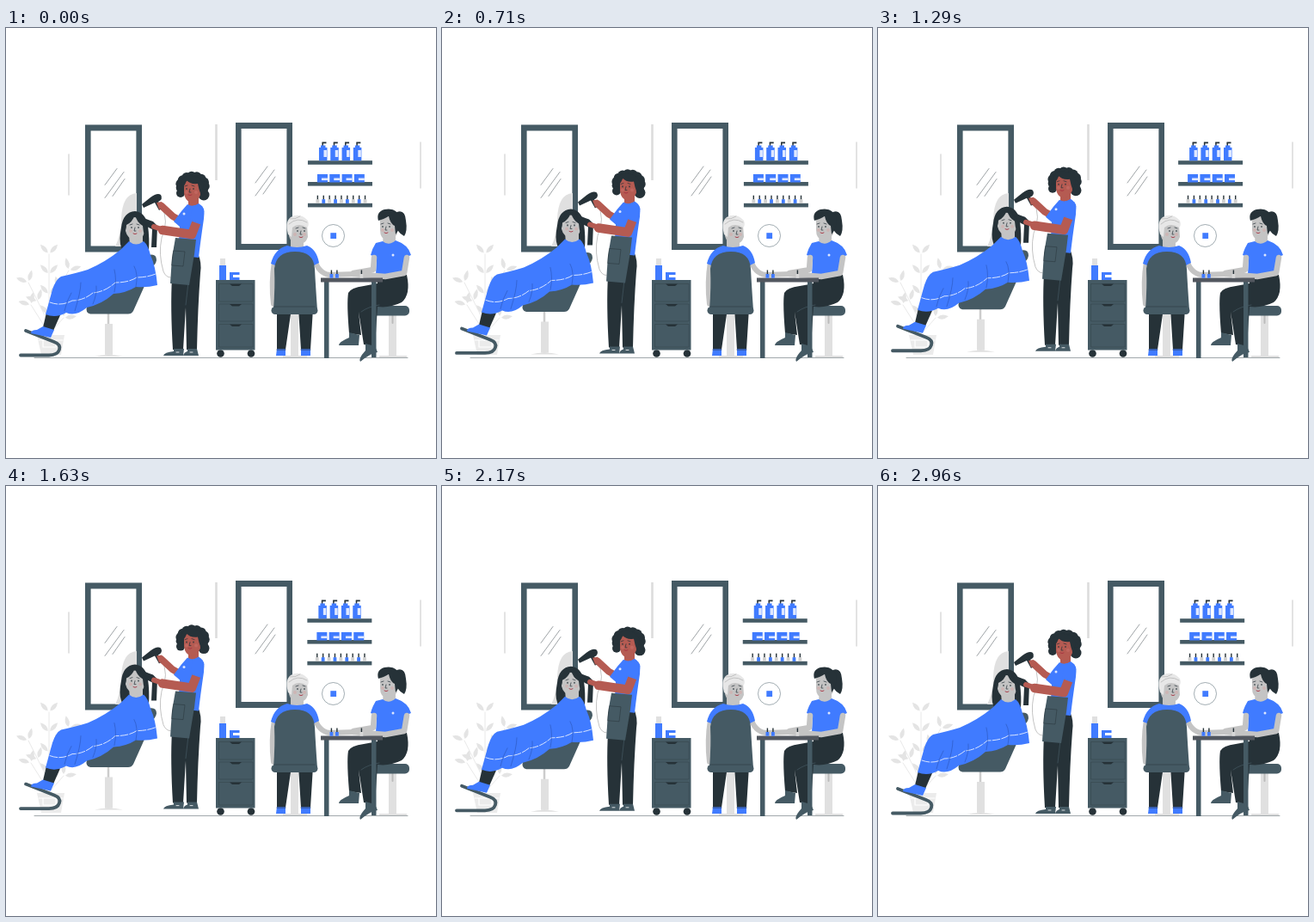
An HTML page that plays this animation: 500 by 500 pixels, repeating every 3000 ms.

```html
<!DOCTYPE html>
<html lang="en">
<head>
<meta charset="utf-8">
<title>Beauty salon</title>
<style>
html, body { margin: 0; width: 100%; height: 100%; overflow: hidden; background: #fff; }
svg { display: block; width: 100vw; height: 100vh; }
.blue { fill: #407bff; }
.dark { fill: #263238; }
.slate { fill: #455a64; }
.grey { fill: #c4c4c4; }
.pale { fill: #e0e0e0; }
.brown { fill: #b55b52; }
.line { fill: none; stroke-linecap: round; stroke-linejoin: round; }
</style>
</head>
<body>
<svg viewBox="0 0 500 500" xmlns="http://www.w3.org/2000/svg">
  <g class="line" stroke="#dcdcdc">
    <path d="M73 147V194M482 133V186" stroke-width="1.6"/>
    <path d="M244.5 112V177" stroke-width="2.6" stroke-linecap="butt"/>
  </g>

  <g id="mirrors"></g>
  <path class="pale" d="M127 254Q134 240 134 222Q135 193 152 192V254Z"/>

  <g id="plant"></g>
  <path d="M36 357H68L64 380H41Z" fill="#ebebeb"/>
  <path class="line" stroke="#fff" stroke-width="1.2" d="M38 363H66M43 363V371H58V363"/>
  <path class="line" stroke="#8a9296" stroke-width=".8" d="M33 383.5H467"/>

  <g id="shelves"></g>

  <circle cx="380.5" cy="241.5" r="13" fill="#fff" stroke="#455a64" stroke-width=".5"/>
  <rect class="blue" x="377.3" y="238.2" width="6.8" height="6.8"/>

  <g id="cabinet">
    <circle class="dark" cx="249.5" cy="378.5" r="4.3"/><circle class="dark" cx="285" cy="378.5" r="4.3"/>
    <rect class="slate" x="244" y="293" width="45.5" height="81.5"/>
    <path class="line" stroke="#263238" stroke-width=".6" d="M248 297.5H287V318H248ZM248 321H287V341H248ZM248 344.5H287V371H248Z" opacity=".5"/>
    <path class="dark" d="M260 297.5H274L271 300H263ZM260 321H274L271 323.5H263ZM260 344.5H274L271 347H263Z"/>
    <path class="blue" d="M248 276H256V293H248ZM260 284H271.5V287H264V290H271.5V293H260Z"/>
    <rect class="pale" x="249" y="268" width="6" height="8"/>
  </g>

  <g id="visitor">
    <path class="pale" d="M331 333H340V381H331ZM322 381H350V383H322Z"/>
    <path class="dark" d="M315 326H332L325 374H315ZM340 326H357L354 374H343Z"/>
    <path class="blue" d="M315 373H325V381H314ZM343 373H354V381H343Z"/>
    <path class="line" stroke="#263238" stroke-width=".8" d="M315 374H325M343 374H354"/>
    <path class="line" stroke="#c4c4c4" stroke-width="6" d="M312 272Q308 296 311 321M359 269Q363 285 376 287L406 286"/>
    <path class="grey" d="M331 243H346V257H331Z"/>
    <path class="blue" d="M308 274Q312 257 327 253Q338 257 350 253Q361 257 364 273L354 278H318Z"/>
    <path class="grey" d="M330 228Q340 222 350 229L351 243Q348 252 340 251Q331 250 329 242Z"/>
    <path d="M328 240Q324 225 331 220Q342 214 351 224Q353 230 350 232Q340 226 333 232L332 243Z" fill="#e7e7e7"/>
    <path class="line" stroke="#b8b8b8" stroke-width=".8" d="M329 228Q339 219 350 226M330 222Q336 223 342 219"/>
    <path class="slate" d="M311 328Q313 300 312 280Q314 260 336 260Q358 260 359 280Q360 300 362 328Z"/>
    <rect class="slate" x="308.5" y="324" width="54" height="9" rx="4.5"/>
    <path class="line" stroke="#263238" stroke-width=".5" d="M312 324H359"/>
  </g>

  <g id="manicurist">
    <path class="pale" d="M445 334H454V381H445ZM434 381H466V383H434Z"/>
    <path class="line" stroke="#bbb" stroke-width="2" d="M449.5 333V343"/>
    <rect class="slate" x="426" y="323" width="43" height="11.5" rx="5"/>
    <path class="dark" d="M430 287H466Q471 310 460 319Q446 326 432 324L429 370L416 368L410 330L413 357L399 355Q396 320 398 308Q401 302 416 300L432 297Z"/>
    <path class="line" stroke="#455a64" stroke-width=".7" d="M434 322Q421 324 413 330"/>
    <path class="slate" d="M399 354L411 357L410 369H387Q387 365 399 360ZM418 367L429 370L432 377Q424 378 412 388Q409 385 418 375Z"/>
    <path class="grey" d="M439 238H453V252Q445 256 438 250Z"/>
    <path class="blue" d="M438 248L430 250Q426 256 424 264L431 267L430 287H465L464 267L471 264Q468 252 453 247Q445 254 438 248Z"/>
    <path class="line" stroke="#c4c4c4" stroke-width="6.5" d="M428 267L427 281L404 285M466 267L463 285L441 289L404 286"/>
    <circle cx="450" cy="264" r="1.5" fill="#dbe6ff"/>
    <path class="dark" d="M452 215Q464 209 465 224Q467 236 463 242Q454 238 453 225Z"/>
    <path class="grey" d="M435 222Q445 216 455 225V239Q451 247 443 247Q435 245 435 235Z"/>
    <path class="dark" d="M433 224Q430 214 440 211Q455 208 459 222Q459 233 453 240L452 230Q447 228 445 219Q440 222 433 224Z"/>
  </g>

  <g id="table">
    <path class="slate" d="M370 294H375.5V384H370ZM425 294H430.5V383H425Z"/>
    <rect x="366" y="290.5" width="72" height="5" fill="#52575f"/>
    <g id="polish"></g>
  </g>

  <g id="client">
    <path class="line" stroke="#ccc" stroke-width="2.5" d="M119 330V345"/>
    <path class="pale" d="M115 344H124V380H115ZM103 382Q119 378 136 382Z"/>
    <path class="slate" d="M94 324L125 306L164 284L166 264Q175 262 175 270Q174 276 168 279L161 300L148 329Q146 332.5 142 332.5H98Q92 331 94 324Z"/>
    <path class="line" stroke="#455a64" stroke-width="3.8" d="M23 352L56 365Q64 368 62 374Q60 380.5 50 380.5H17"/>
    <path class="dark" d="M47 331L63 334L55 352L43 348Z"/>
    <path class="blue" d="M43 347L56 351L52 360L29 355Q29 351 36 351Z"/>
    <path class="dark" d="M134 255Q131 247 134 232Q136 214 150 213Q162 214 165 230Q167 245 166 258H135Z"/>
    <path class="grey" d="M143 239H159V254Q151 259 144 254Z"/>
    <path class="grey" d="M139 224Q148 216 159 224L161 238Q158 247 150 247Q141 245 139 236Z"/>
    <path class="dark" d="M136 240Q136 218 149 214Q159 214 164 232L165 250Q160 243 159 230Q152 226 150 217Q147 226 140 229Q140 236 136 240Z"/>
    <path class="blue" d="M143 248L133 258Q116 272 95 281Q82 285 64 289Q58 292 54 304L46 333Q58 338 70 331Q81 336 94 325Q112 321 125 309Q140 308 151 301Q164 302 176 299Q174 277 168 264Q165 252 160 248Q151 255 143 248Z"/>
    <path class="line" stroke="#fff" stroke-width=".8" stroke-dasharray="9 2" d="M51 319Q64 324 77 317Q90 317 101 308Q115 307 127 296Q143 296 152 290Q164 290 174 286"/>
    <path class="line" stroke="#2a55b8" stroke-width=".6" d="M80 329Q87 307 87 296M101 321Q106 309 105 300M126 307Q129 293 126 281M151 301Q154 286 149 277M68 329Q70 318 76 308"/>
  </g>

  <g id="stylist">
    <path class="line" stroke="#aaa" stroke-width=".7" d="M181 208Q190 224 181 244Q177 263 183 283Q186 290 191 290"/>
    <path class="dark" d="M193 290Q191 325 194 374H206L209 325L210 374H222Q223 325 226 285Q228 273 223 262H200Z"/>
    <path class="line" stroke="#455a64" stroke-width=".7" d="M209 322L212 296"/>
    <path class="slate" d="M195 373H207L206 381H183Q184 377 195 376ZM211 373H222L224 381H206Q207 377 211 376Z"/>
    <path class="line" stroke="#fff" stroke-width=".8" d="M198 377H201M214 377H217"/>
    <path class="brown" d="M212 194H224V210H212Z"/>
    <path class="line" stroke="#b55b52" stroke-width="8" d="M203 224L194 219L181 207"/>
    <path class="blue" d="M211 205L204 213L195 225L202 231L201 249L204 265L224 267Q226 249 230 222Q232 208 224 204Q217 209 211 205Z"/>
    <path class="slate" d="M197 244L221 246L219 263L213 299L191 297L193 267Z"/>
    <path class="line" stroke="#263238" stroke-width=".5" d="M195 259L208 260L206 277L193 276Z"/>
    <path class="dark" d="M155 218Q164 223 171 225L176 230L175 255H169L170 234Q161 231 155 218Z"/>
    <path class="line" stroke="#b55b52" stroke-width="10.5" d="M223 222L216 240L182 235"/>
    <path class="line" stroke="#b55b52" stroke-width="6" d="M184 235L172 231"/>
    <path class="blue" d="M217 207Q229 203 230.5 213L228 229L214 224Z"/>
    <circle cx="207" cy="216" r="1.5" fill="#dbe6ff"/>
    <path class="dark" d="M158 205L168 197Q176 191 180 194Q183 199 177 202L182 209L178 212L173 203L160 209Z"/>
    <path class="brown" d="M175 203L181 202L185 209L178 211Z"/>
    <g id="curls" class="dark"></g>
    <path class="brown" d="M207 180Q215 173 225 181L226 194Q223 203 215 203Q208 201 207 192Z"/>
    <path class="dark" d="M205 185Q202 176 210 172Q225 170 230 182L227 194Q224 188 223 181Q214 182 210 177Q209 182 205 185Z"/>
  </g>
</svg>
<script>
const PERIOD = 3000;
const BLUE = '#407bff', DARK = '#263238';
const byId = id => document.getElementById(id);
const add = (id, markup) => byId(id).insertAdjacentHTML('beforeend', markup);
const repeat = (count, draw) => Array.from({ length: count }, (_, i) => draw(i)).join('');
const rect = (x, y, w, h, fill) =>
  `<rect x="${x}" y="${y}" width="${w}" height="${h}" fill="${fill}"/>`;

function mirror(x, y, h) {
  return `<rect class="slate" x="${x}" y="${y}" width="66" height="${h}"/>` +
    rect(x + 6.6, y + 7, 52.8, h - 14, '#fff') +
    `<path class="line" stroke="${DARK}" stroke-width=".45" d="M${x + 23} ${y + 70}
      l14 -19m-14 34l22 -30m-13 28l14 -20"/>`;
}

function face(x, y, look) {
  return `<g transform="translate(${x} ${y})">
    <g fill="#e88a86" opacity=".25"><circle cx="-5" cy="4" r="2"/><circle cx="6" cy="4" r="2"/></g>
    <g fill="${DARK}"><ellipse cx="${look - 4}" rx=".7" ry="1.1"/><ellipse cx="${look + 4}" rx=".7" ry="1.1"/></g>
    <path class="line" stroke="${DARK}" stroke-width=".7"
      d="M${look - 6} -3l3 -1m5 0l3 1M${look} 0l-1 4h2"/>
    <path class="line" stroke="#a83240" stroke-width=".9" d="M${look - 2} 7q2 1.5 4 0"/>
  </g>`;
}

function leaf(x, y, angle, size) {
  return `<path transform="translate(${x} ${y}) rotate(${angle})"
    d="M2 0Q${size / 2} ${-size / 3} ${size} 0Q${size / 2} ${size / 3} 2 0"/>`;
}

function branch(x0, y0, x1, y1, count) {
  const tilt = Math.atan2(y1 - y0, x1 - x0) * 180 / Math.PI;
  return `<path class="line" stroke="#e2e2e2" stroke-width=".8" d="M${x0} ${y0}L${x1} ${y1}"/>` +
    repeat(count, i => {
      const k = (i + 1) / count, x = x0 + (x1 - x0) * k, y = y0 + (y1 - y0) * k;
      return leaf(x, y, tilt - 42, 15) + leaf(x, y, tilt + 42, 15);
    });
}

function polish(x, y, color) {
  return rect(x + 1.2, y, 1.4, 5, DARK) + rect(x, y + 4.5, 3.8, 4.7, color);
}

function pumpBottle(x) {
  return rect(x + 3.5, 133.5, 1.5, 5, DARK) + rect(x + 3.5, 132.5, 5, 1.8, DARK) +
    rect(x + 2, 136.5, 5.5, 3, BLUE) + rect(x, 139, 9.5, 15.2, BLUE) +
    rect(x + 5.5, 142, 3.5, 8, '#dfe8ff');
}

function jar(x) {
  return rect(x, 170, 12, 9.5, BLUE) + rect(x + 5, 174.5, 7, 2.6, '#dfe8ff');
}

add('mirrors', mirror(92, 112.5, 148) + mirror(267, 110, 148));
add('plant', `<g fill="#e4e4e4">${branch(50, 357, 50, 263, 4)}${branch(48, 340, 26, 296, 2)}
  ${branch(49, 325, 73, 282, 2)}${branch(48, 352, 29, 322, 1)}${branch(51, 355, 67, 337, 1)}</g>`);
add('shelves',
  repeat(3, i => rect(351, 154.2 + i * 24.8, 75, 4.6, '#455a64')) +
  repeat(4, i => pumpBottle(364 + i * 13.3) + jar(362 + i * 14.3)) +
  repeat(9, i => polish(360.5 + i * 6.9, 194.7, i % 2 ? BLUE : '#d0d0d0')));
add('polish', polish(376.5, 281.5, BLUE) + polish(383, 281.5, BLUE) + polish(411.5, 281.5, '#d8d8d8'));
add('curls', repeat(11, i => {
  const a = (i * 25 - 195) * Math.PI / 180;
  return `<circle cx="${217 + 14 * Math.cos(a)}" cy="${183 + 10.5 * Math.sin(a)}" r="5.8"/>`;
}) + '<circle cx="230" cy="194" r="6.5"/><circle cx="203" cy="192" r="5"/>');
add('client', face(150, 232, 0));
add('stylist', face(215, 187, -1));
add('visitor', face(341, 236, 2));
add('manicurist', face(443, 231, -1));

function render(ms) {
  const wave = (cycles, phase) => Math.cos(2 * Math.PI * (cycles * ms / PERIOD - phase));
  const lift = -2.75 * (1 - wave(1, 0));
  const sway = -0.8 - 1.2 * wave(3, 0.36);
  byId('client').setAttribute('transform', `translate(0 ${lift})`);
  byId('stylist').setAttribute('transform', `translate(0 ${lift})`);
  byId('shelves').setAttribute('transform', `translate(${sway} 0)`);
}

const start = performance.now();
function tick() {
  render((performance.now() - start) % PERIOD);
  requestAnimationFrame(tick);
}
render(0);
requestAnimationFrame(tick);
</script>
</body>
</html>
```
